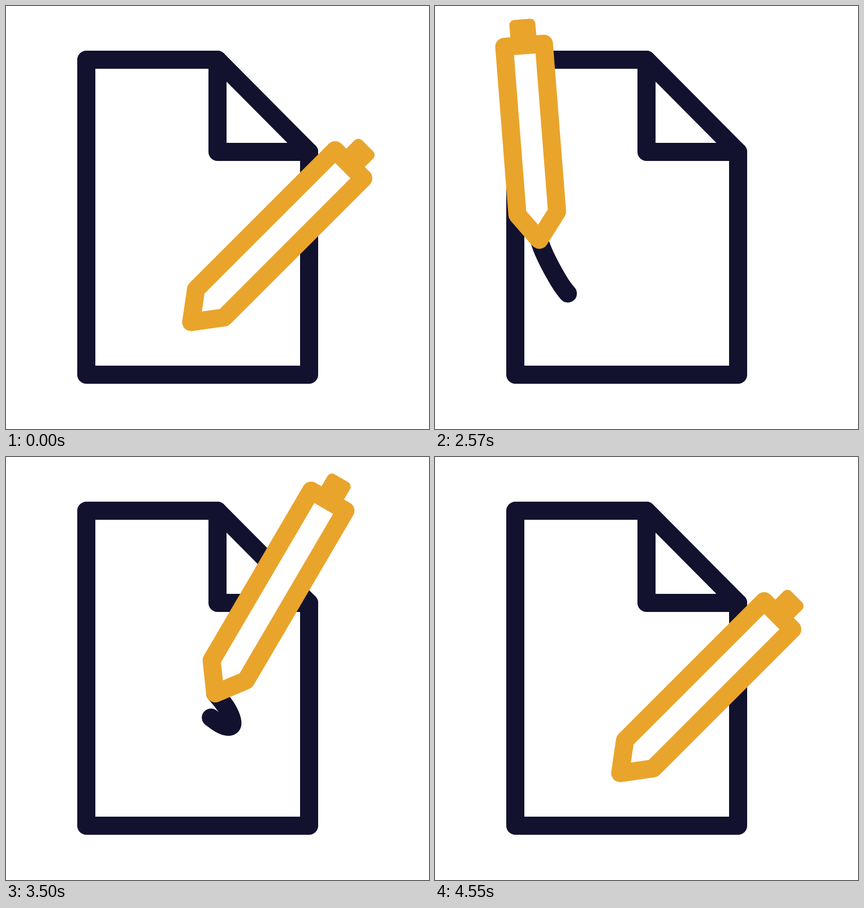
Animation of 748x748 px, one loop 4.58 s. Source, as an HTML page with a canvas:

```html
<!DOCTYPE html>
<html lang="en">
<head>
<meta charset="utf-8">
<title>Pen writing on a page</title>
<style>
  html, body { margin: 0; height: 100%; overflow: hidden; background: #fff; }
  canvas { display: block; }
</style>
</head>
<body>
<canvas id="stage" width="748" height="748"></canvas>
<script>
const ctx = document.getElementById('stage').getContext('2d');
const INK = '#12122f', GOLD = '#e9a42b', LINE = 32;
const LOOP = 4580, START = 2030, LOWEST = 2870, UPRIGHT = 4000, END = 4550, STEP = 30;
const TRAIL = 108, FADE = 500;

// the scribble: the nib passes these points at equal intervals
const scribble = [
  [329.5, 557], [299, 560], [264, 537], [220, 488], [183, 404], [220, 376], [296, 410],
  [336, 440], [380, 473], [400, 473], [389, 442], [348, 393], [313, 355], [319, 384],
  [334, 433], [351, 507], [335, 556], [309, 552], [327.5, 559]
];

const progress = (t, from, to) => Math.min(1, Math.max(0, (t - from) / (to - from)));

// Catmull-Rom curve through the scribble
function nibAt(t) {
  const last = scribble.length - 1;
  const place = progress(t, START, END) * last;
  const i = Math.min(last - 1, Math.floor(place)), u = place - i;
  const [a, b, c, d] = [i - 1, i, i + 1, i + 2].map(k => scribble[Math.min(last, Math.max(0, k))]);
  return [0, 1].map(n => b[n] + u / 2 * (c[n] - a[n] +
    u * (2 * a[n] - 5 * b[n] + 4 * c[n] - d[n] + u * (3 * (b[n] - c[n]) + d[n] - a[n]))));
}

// leans left, swings back upright, then settles
function tiltAt(t) {
  const fall = 1 - (1 - progress(t, START, LOWEST)) ** 1.15;
  const rise = Math.sin(progress(t, LOWEST, UPRIGHT) * Math.PI / 2);
  return 45 - 71.3 * fall + 73.8 * rise - 2.5 * progress(t, UPRIGHT, END);
}

// the barrel is foreshortened during the swing to the left
const lengthAt = t => 395 - 62 * Math.exp(-(((t - 2665) / 205) ** 2));

function trace(points, closed) {
  ctx.beginPath();
  points.forEach(p => ctx.lineTo(...p));
  if (closed) ctx.closePath();
}

function drawPaper() {
  ctx.strokeStyle = INK;
  trace([[142, 95], [374, 95], [536, 258], [536, 652], [142, 652]], true);
  ctx.stroke();
  trace([[374, 95], [374, 258], [536, 258]]);
  ctx.stroke();
}

function drawTrail(t) {
  let left = TRAIL * Math.min(1, (t - START) / FADE, (END - t) / FADE);
  if (left <= 0) return;
  const points = [nibAt(t)];
  for (let past = t - 3; left > 0 && past > START; past -= 3) {
    const p = nibAt(past), q = points[points.length - 1];
    left -= Math.hypot(p[0] - q[0], p[1] - q[1]);
    points.push(p);
  }
  ctx.strokeStyle = INK;
  trace(points);
  ctx.stroke();
}

function withPen(t, paint) {
  const top = -lengthAt(t);
  ctx.save();
  ctx.translate(...nibAt(t));
  ctx.rotate(tiltAt(t) * Math.PI / 180);
  trace([[0, 0], [-35, -47], [-35, top], [35.3, top], [35.3, -47]], true);
  paint(top);
  ctx.restore();
}

function draw(t) {
  ctx.fillStyle = '#fff';
  ctx.fillRect(0, 0, 748, 748);
  ctx.lineWidth = LINE;
  ctx.lineJoin = ctx.lineCap = 'round';
  drawPaper();
  withPen(t, () => ctx.fill());
  drawTrail(t);
  withPen(t, top => {
    ctx.strokeStyle = ctx.fillStyle = GOLD;
    ctx.stroke();
    ctx.beginPath();
    ctx.roundRect(-23, top - 46, 46, 55, 9);
    ctx.fill();
  });
}

function tick() {
  const t = performance.now() % LOOP;
  draw(t < START ? END : START + Math.floor((t - START) / STEP) * STEP);
  requestAnimationFrame(tick);
}
tick();
</script>
</body>
</html>
```
